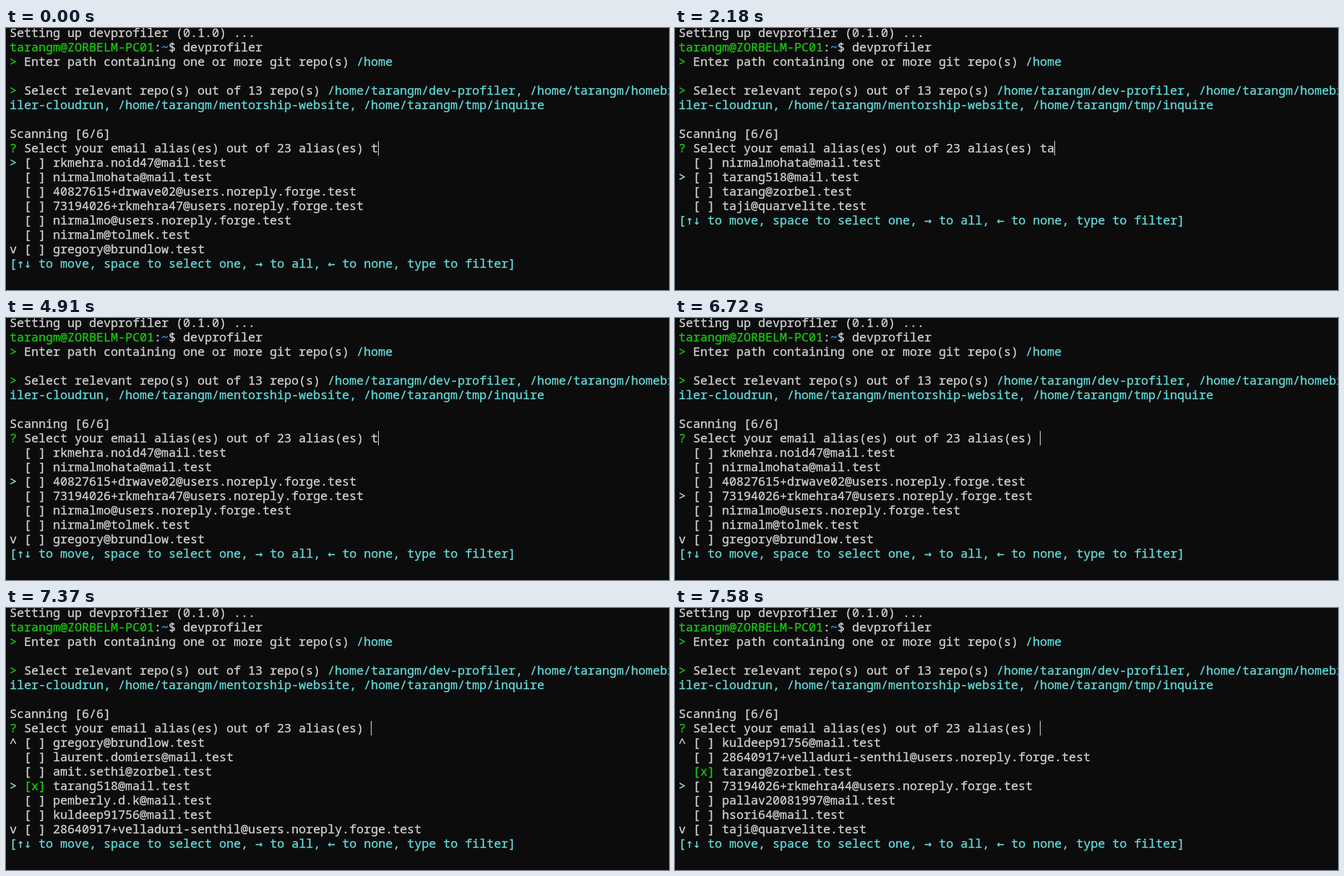
Recreate the animation shown at these times as an HTML page. Size 1101 px wide and 436 px high, loop 8 s.

```html
<!DOCTYPE html>
<html lang="en">
<head>
<meta charset="utf-8">
<title>devprofiler</title>
<style>
html, body { margin: 0; width: 100%; height: 100%; overflow: hidden; background: #0c0c0c; }
body { position: relative; }
pre {
  position: absolute; left: 6px; top: -4px; margin: 0;
  font: 20px/24px "Noto Sans Mono", "Liberation Mono", monospace;
  font-variant-ligatures: none;
  -webkit-text-stroke: 0.4px;
  color: #ccc;
}
.green { color: #16c60c; }
.cyan { color: #61d6d6; }
.blue { color: #3a96dd; }
.pale { color: #a6d8dc; }
.arrow { font-family: "DejaVu Sans Mono", monospace; }
#caret { position: absolute; top: 188px; width: 1px; height: 24px; background: #fff; }
</style>
</head>
<body>
<pre id="screen"></pre>
<div id="caret"></div>
<script>
const LOOP = 8000, CELL = 12, LEFT = 6, PAGE = 7, TOTAL = 23;
const noreply = "@users.noreply.forge.test";
const emails = [
  "rkmehra.noid47@mail.test",
  "nirmalmohata@mail.test",
  "40827615+drwave02" + noreply,
  "73194026+rkmehra47" + noreply,
  "nirmalmo" + noreply,
  "nirmalm@tolmek.test",
  "gregory@brundlow.test",
  "laurent.domiers@mail.test",
  "amit.sethi@zorbel.test",
  "tarang518@mail.test",
  "pemberly.d.k@mail.test",
  "kuldeep91756@mail.test",
  "28640917+velladuri-senthil" + noreply,
  "tarang@zorbel.test",
  "73194026+rkmehra44" + noreply,
  "pallav20081997@mail.test",
  "hsori64@mail.test",
  "taji@quarvelite.test"
];
const tickOrder = ["tarang518@mail.test", "tarang@zorbel.test"];

// Each entry changes part of the state from its time on.
const events = [
  [0, { typed: "t", selected: 0, ticks: 0, caret: true }],
  [400, { caret: false }],
  [600, { typed: "ta", caret: true }],
  [1260, { caret: false }],
  [1850, { caret: true }],
  [2180, { selected: 1 }],
  [2860, { caret: false }],
  [3400, { ticks: 1, caret: true }],
  [3780, { selected: 2 }],
  [4180, { ticks: 2 }],
  [4910, { typed: "t" }],
  [5040, { typed: "" }],
  [5640, { caret: false }],
  [6240, { caret: true }],
  [6720, { selected: 3 }],
  [7240, { selected: 5 }],
  [7310, { selected: 7 }],
  [7370, { selected: 9 }],
  [7430, { selected: 11 }],
  [7510, { selected: 13 }],
  [7580, { selected: 14 }]
];

const paint = (style, text) => `<span class="${style}">${text}</span>`;
const prompt = paint("green", "&gt;");
const header = [
  "Setting up devprofiler (0.1.0) ...",
  paint("green", "tarangm@ZORBELM-PC01") + ":" + paint("blue", "~") + "$ devprofiler",
  prompt + " Enter path containing one or more git repo(s) " + paint("cyan", "/home"),
  "",
  prompt + " Select relevant repo(s) out of 13 repo(s) " +
    paint("cyan", "/home/tarangm/dev-profiler, /home/tarangm/homebi"),
  paint("cyan", "iler-cloudrun, /home/tarangm/mentorship-website, /home/tarangm/tmp/inquire"),
  "",
  "Scanning [6/6]"
];
const hint = paint("cyan",
  "[↑↓ to move, space to select one, → to all, ← to none, type to filter]"
    .replace(/[←-↓]/g, arrow => paint("arrow", arrow)));
const question = "Select your email alias(es) out of 23 alias(es) ";

function listRows({ typed, selected, ticks }) {
  const found = emails.filter(email => email.includes(typed));
  const paged = found.length > PAGE;
  const top = paged ? Math.max(0, selected - 3) : 0;
  const ticked = tickOrder.slice(0, ticks);
  return found.slice(top, top + PAGE).map((email, row) => {
    let mark = " ";
    if (top + row === selected) mark = paint(row ? "pale" : "cyan", "&gt;");
    else if (row === 0 && top > 0) mark = "^";
    else if (paged && row === PAGE - 1 && top + PAGE < TOTAL) mark = "v";
    const box = ticked.includes(email) ? paint("green", "[x]") : "[ ]";
    return `${mark} ${box} ${email}`;
  });
}

const screen = document.getElementById("screen");
const caret = document.getElementById("caret");
let shown = "";

function draw(now) {
  const time = now % LOOP;
  const state = Object.assign({}, ...events.filter(e => e[0] <= time).map(e => e[1]));
  const ask = paint("green", "?") + " " + question + state.typed;
  const html = [...header, ask, ...listRows(state), hint].join("\n");
  if (html !== shown) screen.innerHTML = shown = html;
  caret.style.left = LEFT + CELL * (2 + question.length + state.typed.length) + "px";
  caret.style.visibility = state.caret ? "visible" : "hidden";
}

const start = performance.now();
function tick() {
  draw(performance.now() - start);
  requestAnimationFrame(tick);
}
tick();
</script>
</body>
</html>
```
